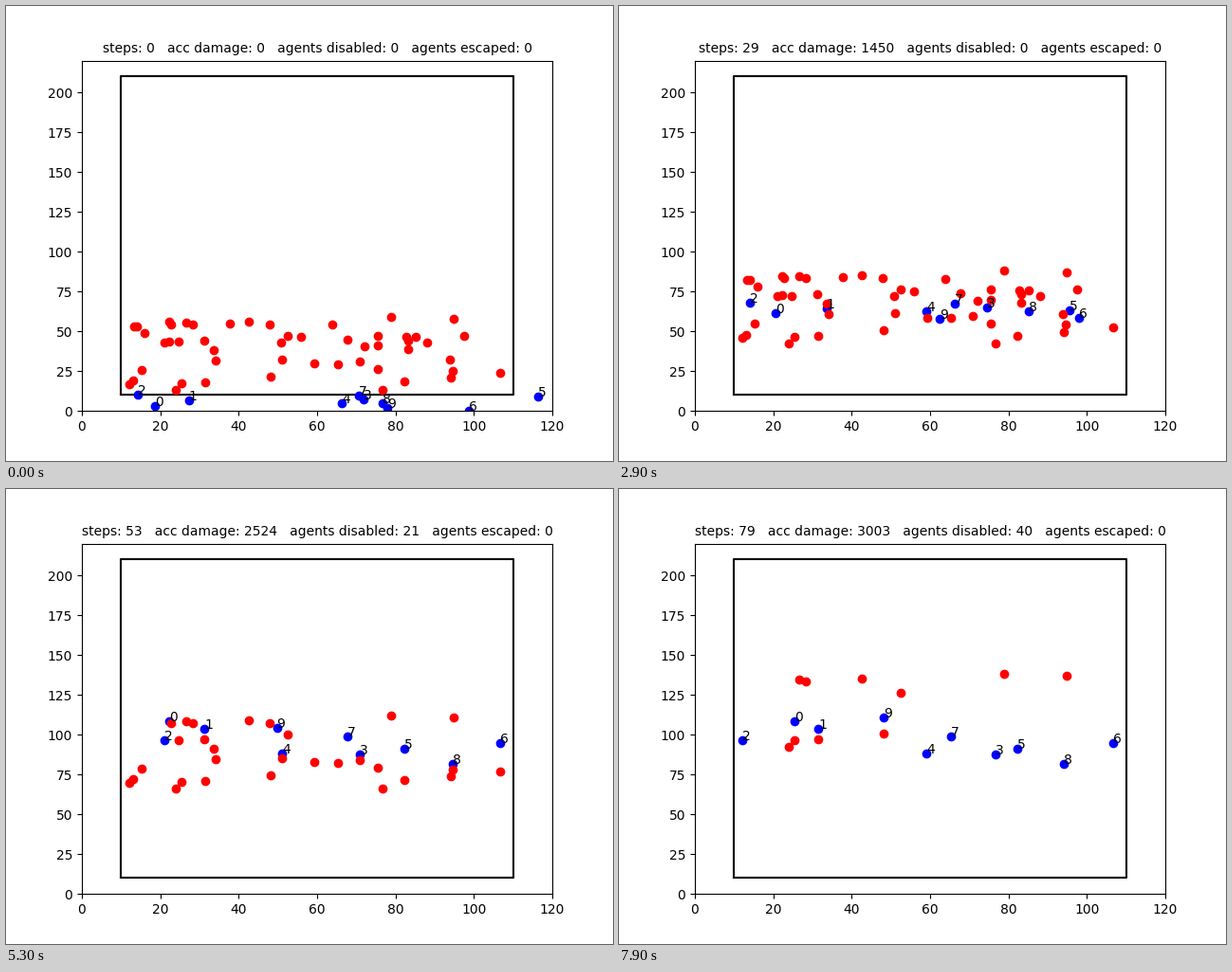
Write a matplotlib script that moves like this. It is 640 px wide and 480 px high and loops after 8 s.

```python
import numpy as np
import matplotlib.pyplot as plt
from matplotlib.animation import FuncAnimation

STEPS = 80
SPEED = 2.0    # chasers, per step; runners climb one unit per step
REACH = 1.25   # catching distance
LATE = 1.0     # how far past a chaser a runner may be and still be chased

# start positions of the runners
START = np.array([
    (13.3, 53.3), (14.0, 53.3), (16.0, 49.0), (22.3, 55.8), (22.8, 54.2),
    (26.6, 55.6), (28.3, 54.4), (37.8, 54.8), (42.6, 56.1), (47.9, 54.3),
    (21.1, 43.1), (22.2, 43.5), (24.7, 43.4), (31.2, 44.4), (33.6, 38.4),
    (34.1, 31.7), (15.2, 25.8), (13.1, 19.0), (12.1, 16.8), (24.0, 13.3),
    (25.4, 17.4), (31.5, 18.0), (48.2, 21.5), (50.8, 43.0), (52.5, 47.2),
    (55.9, 46.3), (51.1, 32.3), (59.3, 29.7), (65.3, 29.2), (63.9, 54.0),
    (67.7, 44.7), (70.9, 30.9), (72.1, 40.4), (75.5, 47.4), (75.5, 41.0),
    (75.5, 26.1), (76.7, 13.2), (78.9, 59.0), (82.7, 46.5), (83.2, 44.2),
    (83.2, 38.8), (82.3, 18.4), (85.2, 46.7), (88.1, 43.0), (94.8, 57.9),
    (97.5, 47.4), (93.9, 32.0), (94.6, 25.1), (94.1, 20.8), (106.7, 23.7)])

# start x and y of each chaser, then the lane it guards
CHASERS = [(18.6, 3.2, 22.25, 25.5), (27.3, 6.7, 31, 38),
           (14.2, 10.2, 12, 21.5), (71.9, 7.3, 70, 77),
           (66.3, 4.9, 50, 60), (116.3, 9.0, 82, 86),
           (98.7, 0.3, 97, 107), (70.7, 9.4, 63, 68),
           (76.7, 5.1, 88, 94.7), (77.9, 1.9, 47, 49)]


class Chaser:
    def __init__(self, x, y, low, high):
        self.pos = np.array([x, y])
        self.lane = (START[:, 0] >= low) & (START[:, 0] <= high)
        self.holding = False

    def target(self, runners, alive):
        """Highest runner of the lane; at first, near ones are preferred."""
        free = self.lane & alive
        score = runners[:, 1].copy()
        if self.holding:
            free &= score <= self.pos[1] + LATE
        else:
            score -= 0.4 * abs(runners[:, 0] - self.pos[0])
        return runners[np.where(free, score, -np.inf).argmax()] if free.any() else None

    def move(self, runners, alive):
        aim = self.target(runners, alive)
        if aim is None:
            return
        dx, dy = aim - self.pos
        if dy > 0:
            # solve dx^2 + (dy + t)^2 = (SPEED t)^2 for the meeting point
            a = SPEED ** 2 - 1
            dy += (dy + np.sqrt(dy ** 2 + a * (dx ** 2 + dy ** 2))) / a
        else:
            dy = 0
        dist = np.hypot(dx, dy)
        if dist <= SPEED:
            self.holding = True
        self.pos = self.pos + np.array([dx, dy]) * min(1, SPEED / max(dist, 1e-9))

    def catch(self, runners, alive):
        if self.holding:
            alive &= np.hypot(*(runners - self.pos).T) > REACH


def simulate():
    team = [Chaser(*c) for c in CHASERS]
    runners, alive = START.copy(), np.ones(len(START), bool)
    damage, history = 0, []
    for _ in range(STEPS):
        history.append((runners[alive], np.array([c.pos for c in team]), damage))
        damage += alive.sum()
        for c in team:
            c.move(runners, alive)
        runners = runners + (0, 1)
        for c in team:
            c.catch(runners, alive)
    return history


history = simulate()

fig, ax = plt.subplots(figsize=(6.4, 4.8), dpi=100)
ax.set_xlim(0, 120)
ax.set_ylim(0, 220)
ax.plot([10, 110, 110, 10, 10], [10, 10, 210, 210, 10], color="black")
blue, = ax.plot([], [], "o", color="blue")
red, = ax.plot([], [], "o", color="red")
labels = [ax.text(0, 0, str(i)) for i in range(len(CHASERS))]
title = ax.set_title("", fontsize=10)


def draw(step):
    left, chasers, damage = history[step]
    red.set_data(*left.T)
    blue.set_data(*chasers.T)
    for label, pos in zip(labels, chasers):
        label.set_position(pos)
    title.set_text(f"steps: {step}   acc damage: {damage}   "
                   f"agents disabled: {len(START) - len(left)}   agents escaped: 0")
    return [red, blue, title, *labels]


anim = FuncAnimation(fig, draw, frames=STEPS, interval=100,
                     repeat=True, repeat_delay=0)
plt.show()
```
